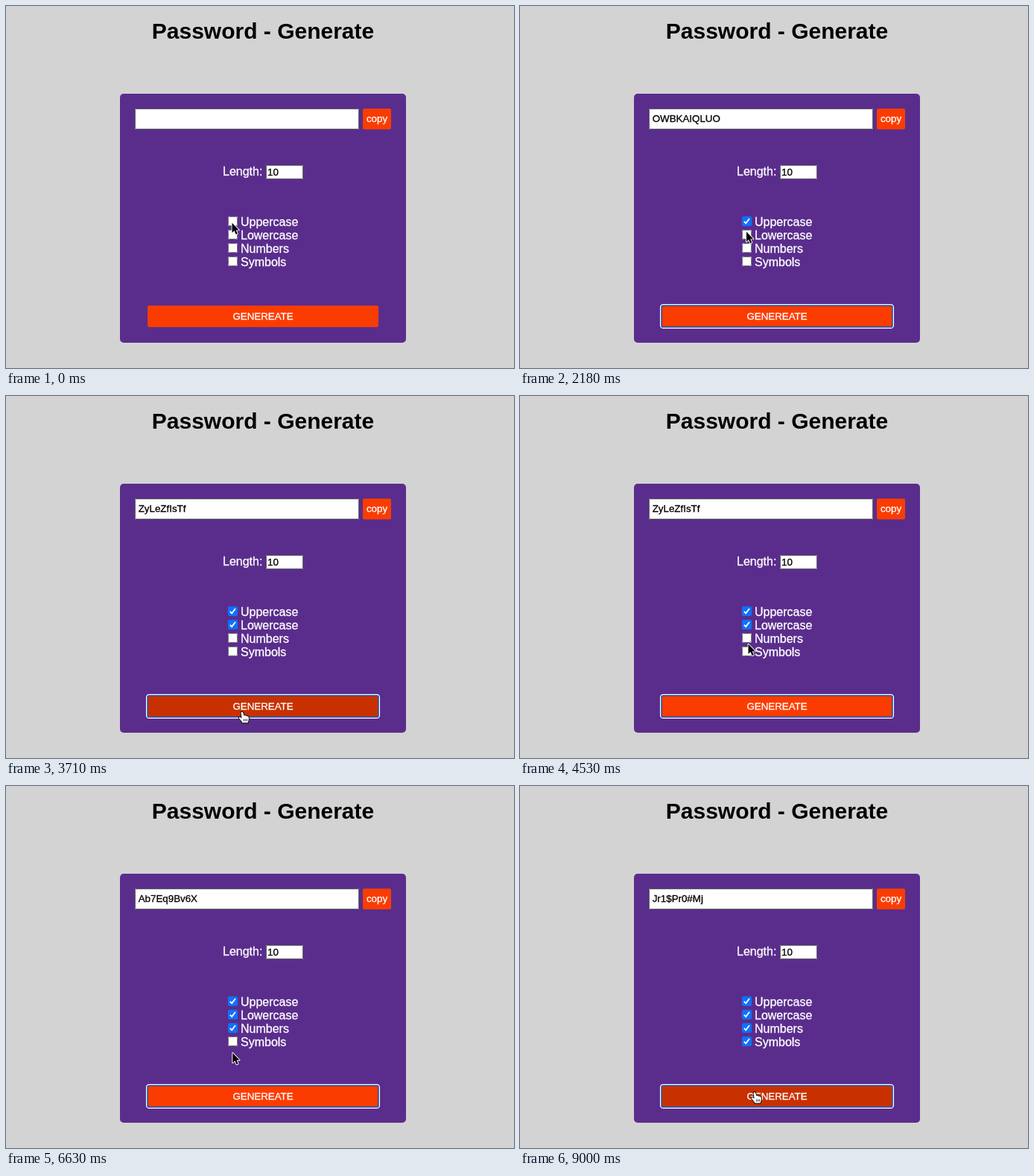
These frames come from a looping animation (682x487 px, 9100 ms). An HTML page with a canvas:

```html
<!DOCTYPE html>
<html lang="en">
<head>
<meta charset="utf-8">
<title>Password - Generate</title>
<style>
html, body { margin: 0; width: 100%; height: 100%; overflow: hidden; background: #d3d3d3; }
canvas { display: block; }
</style>
</head>
<body>
<canvas id="stage" width="682" height="487"></canvas>
<script>
const ctx = document.getElementById('stage').getContext('2d');
const LOOP = 9100, STEP = 1000 / 11, LAST_STEP = 99;
const ROUND = 2300;       // tick an option, generate, return
const TICK_AT = 270, GENERATE_AT = 1420;
const GO_DOWN = 500, GO_UP = 1660, TRAVEL = 520;
const FONT = 'Arial, "Liberation Sans", sans-serif';
const ORANGE = '#fb3c00', ORANGE_HOVER = '#c83000';
const button = { x: 190, y: 403, w: 310, h: 29 };

const rounds = [
  { label: 'Uppercase', password: 'OWBKAIQLUO', tick: [303, 291], press: [317, 424] },
  { label: 'Lowercase', password: 'ZyLeZfIsTf', tick: [303.5, 303], press: [317, 425] },
  { label: 'Numbers', password: 'Ab7Eq9Bv6X', tick: [306, 333], press: [316, 421] },
  { label: 'Symbols', password: 'Jr1$Pr0#Mj', tick: [301, 344], press: [315, 412] }
];

function ease(phase, start) {
  const p = Math.min(1, Math.max(0, (phase - start) / TRAVEL));
  return p * p * (3 - 2 * p);
}

const mix = (a, b, amount) => a.map((v, i) => v + (b[i] - v) * amount);

function pointerAt(index, phase) {
  const { tick, press } = rounds[index];
  const next = rounds[index + 1];
  const down = mix(tick, press, ease(phase, GO_DOWN));
  return next ? mix(down, next.tick, ease(phase, GO_UP)) : down;
}

function box(x, y, w, h, radius, fill) {
  ctx.beginPath();
  ctx.roundRect(x, y, w, h, radius);
  ctx.fillStyle = fill;
  ctx.fill();
}

function outline(x, y, w, h, radius, color, width) {
  ctx.beginPath();
  ctx.roundRect(x, y, w, h, radius);
  ctx.strokeStyle = color;
  ctx.lineWidth = width;
  ctx.stroke();
}

// A hairline stroke thickens the small text slightly.
function text(str, x, y, size, color, align = 'left', weight = '') {
  ctx.font = `${weight} ${size}px ${FONT}`;
  ctx.textAlign = align;
  ctx.fillStyle = ctx.strokeStyle = color;
  ctx.lineWidth = .3;
  ctx.fillText(str, x, y);
  if (!weight) ctx.strokeText(str, x, y);
}

function field(x, y, w, h) {
  box(x, y, w, h, 0, '#fff');
  outline(x + .5, y + .5, w - 1, h - 1, 0, '#686868', 1);
}

function checkbox(x, y, checked) {
  box(x, y, 13, 13, 2, checked ? '#0f70ff' : '#fff');
  if (!checked) return outline(x + .5, y + .5, 12, 12, 2, '#767676', 1);
  ctx.beginPath();
  ctx.moveTo(x + 2.8, y + 6.8);
  ctx.lineTo(x + 5.2, y + 9.4);
  ctx.lineTo(x + 10, y + 3);
  ctx.strokeStyle = '#fff';
  ctx.lineWidth = 1.8;
  ctx.stroke();
}

const arrow = new Path2D('M.5 .8V14L3.5 11.2L5.7 16.2L7.8 15.3L5.7 10.4H9.8Z');
const hand = new Path2D('M-1.5 1.2C-1.5-.4 .7-.5 1.2 1L2.5 5Q4.4 4 5 5.4Q6.6 4.8 7.2 6.1Q8.9 6 8.9 7.7Q9 10 7.7 14.6H.4Q-.4 12.3-4.1 8.7C-4.9 7.7-3.5 6.4-2.3 7.2L-.4 8.5Z');

function drawPointer(x, y, overButton) {
  ctx.save();
  ctx.translate(x, y);
  ctx.lineJoin = 'round';
  const [shape, fill, edge] = overButton ? [hand, '#fff', '#000'] : [arrow, '#000', '#fff'];
  ctx.lineWidth = 1.8;
  ctx.strokeStyle = edge;
  ctx.stroke(shape);
  ctx.fillStyle = fill;
  ctx.fill(shape);
  if (overButton) {
    ctx.fillStyle = edge;
    for (let i = 0; i < 3; i++) ctx.fillRect(2.2 + 2 * i, 9.5, .8, 3);
  }
  ctx.restore();
}

function draw(t) {
  const index = Math.min(rounds.length - 1, Math.floor(t / ROUND));
  const phase = t - index * ROUND;
  const [x, y] = pointerAt(index, phase);
  const hover = y >= button.y && y <= button.y + button.h;
  const generated = phase >= GENERATE_AT;
  const focused = generated || (index > 0 && phase < TICK_AT);
  const current = rounds[generated ? index : index - 1];

  ctx.fillStyle = '#d3d3d3';
  ctx.fillRect(0, 0, 682, 487);
  text('Password - Generate', 345, 44, 30, '#000', 'center', 'bold');
  box(153, 118, 384, 335, 5, '#5a2d8c');

  field(173, 138, 301, 28);
  if (current) text(current.password, 177.7, 156, 13.333, '#000');
  box(479, 138, 38, 28, 2, ORANGE);
  text('copy', 498, 156, 13.333, '#fff', 'center');

  text('Length:', 291, 228, 16, '#fff');
  field(349, 214, 50, 19);
  text('10', 351, 228, 13.333, '#000');

  rounds.forEach(({ label }, i) => {
    checkbox(298, 283 + 18 * i, t >= i * ROUND + TICK_AT);
    text(label, 315, 296 + 18 * i, 16, '#fff');
  });

  box(button.x, button.y, button.w, button.h, 2, hover ? ORANGE_HOVER : ORANGE);
  if (focused) {
    outline(button.x, button.y, button.w, button.h, 2, '#2c4f9c', 2);
    outline(188.6, 401.6, 312.8, 31.8, 3.5, '#fff', 1.3);
  }
  text('GENEREATE', 345, 422, 13.333, '#fff', 'center');
  drawPointer(x, y, hover);
}

function tick() {
  const t = performance.now() % LOOP;
  draw(Math.min(LAST_STEP, Math.floor((t + 20) / STEP)) * STEP);
  requestAnimationFrame(tick);
}
tick();
</script>
</body>
</html>
```
